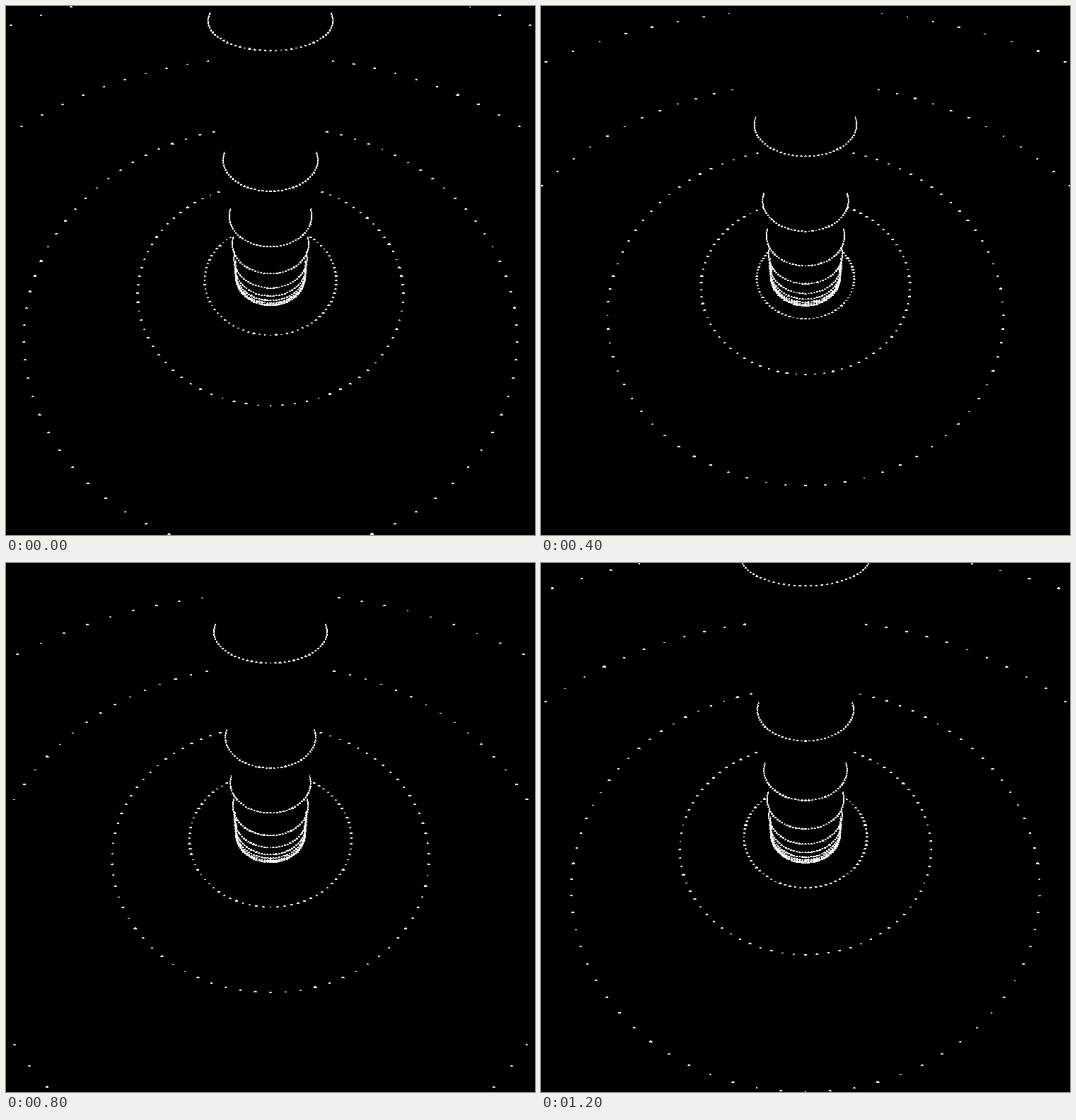
These frames come from a looping animation (748x748 px, 1240 ms). An HTML page with a canvas:

```html
<!DOCTYPE html>
<html lang="en">
<head>
<meta charset="utf-8">
<title>Dot fountain</title>
<style>
  html, body { margin: 0; width: 100%; height: 100%; overflow: hidden; background: #000; }
  canvas { display: block; }
</style>
</head>
<body>
<canvas id="stage" width="748" height="748"></canvas>
<script>
const SIZE = 748, MID = 374;
const FRAMES = 31, FRAME_MS = 40, STEP = 0.0638;
const DOTS = 80;          // dots per ring
const COLUMN_R = 48.7;

// y: screen height of the origin, tilt: foreshortening, persp: depth per unit, rise: screen lift per height
const floorView = { y: 381.6, tilt: 0.826, persp: 8.94e-4, rise: 0 };
const columnView = { y: 383.4, tilt: 0.81, persp: 9.4e-4, rise: 451.7 };

const ctx = document.getElementById('stage').getContext('2d');

const floorRadius = u => 137.7 * Math.exp(0.5237 * u - 0.0094 * u * u) - 45;
const columnHeight = u => 0.447 * Math.exp(-0.495 * u - 0.005 * u * u);

function rand(a, b, c) {
  const v = Math.sin(a * 12.9898 + b * 78.233 + c * 37.719) * 43758.5453;
  return v - Math.floor(v);
}

function project(view, radius, angle, height) {
  const near = radius * Math.cos(angle);
  const depth = 1 - height - near * view.persp;
  return {
    x: MID + radius * Math.sin(angle) / depth,
    y: view.y - (height * view.rise - near * view.tilt) / depth,
    near, depth
  };
}

// Upper half of an ellipse, filled in whole pixels
function dome(x, y, rx, ry) {
  const base = y + 1;
  for (let row = Math.floor(base - 0.5); row + 0.5 > base - ry; row--) {
    const dy = (base - row - 0.5) / ry;
    const half = rx * Math.sqrt(Math.max(0, 1 - dy * dy));
    const left = Math.round(x - half);
    ctx.fillRect(left, row, Math.max(1, Math.round(x + half) - left), 1);
  }
}

function behindColumn(p) {
  const halfWidth = COLUMN_R * (1 + (columnView.y - p.y) / columnView.rise);
  return p.near < 0 && Math.abs(p.x - MID) < halfWidth;
}

function drawFloorRing(u, seed, frame) {
  const radius = floorRadius(u);
  if (radius < COLUMN_R + 0.5) return;
  for (let i = 0; i < DOTS; i++) {
    const p = project(floorView, radius, i * 2 * Math.PI / DOTS, 0);
    if (p.depth < 0.1 || behindColumn(p)) continue;
    const r = 1.4 + rand(i, seed, frame);
    dome(p.x, p.y, r, r);
  }
}

// Dots turn edge-on and stretch into a line at the sides of the column
function drawColumnRing(u, seed, frame) {
  const height = columnHeight(u);
  for (let i = -22; i <= 22; i++) {
    const angle = i * 2 * Math.PI / DOTS;
    const p = project(columnView, COLUMN_R, angle, height);
    const front = Math.max(0, Math.cos(angle));
    const vary = rand(i, seed, frame);
    dome(p.x, p.y, 1 + front * (0.5 + 0.7 * vary), 3.6 - front * (1.9 - 0.8 * vary));
  }
}

function draw(frame) {
  ctx.fillStyle = '#000';
  ctx.fillRect(0, 0, SIZE, SIZE);
  ctx.fillStyle = '#fff';
  const phase = (frame * STEP) % 1;
  for (let k = -1; k <= 5; k++) drawFloorRing(phase + k, k, frame);
  for (let k = -1; k <= 9; k++) drawColumnRing(phase + k, k + 20, frame);
}

let shown = -1;
function tick() {
  const frame = Math.floor(performance.now() / FRAME_MS) % FRAMES;
  if (frame !== shown) draw(shown = frame);
  requestAnimationFrame(tick);
}
tick();
</script>
</body>
</html>
```
